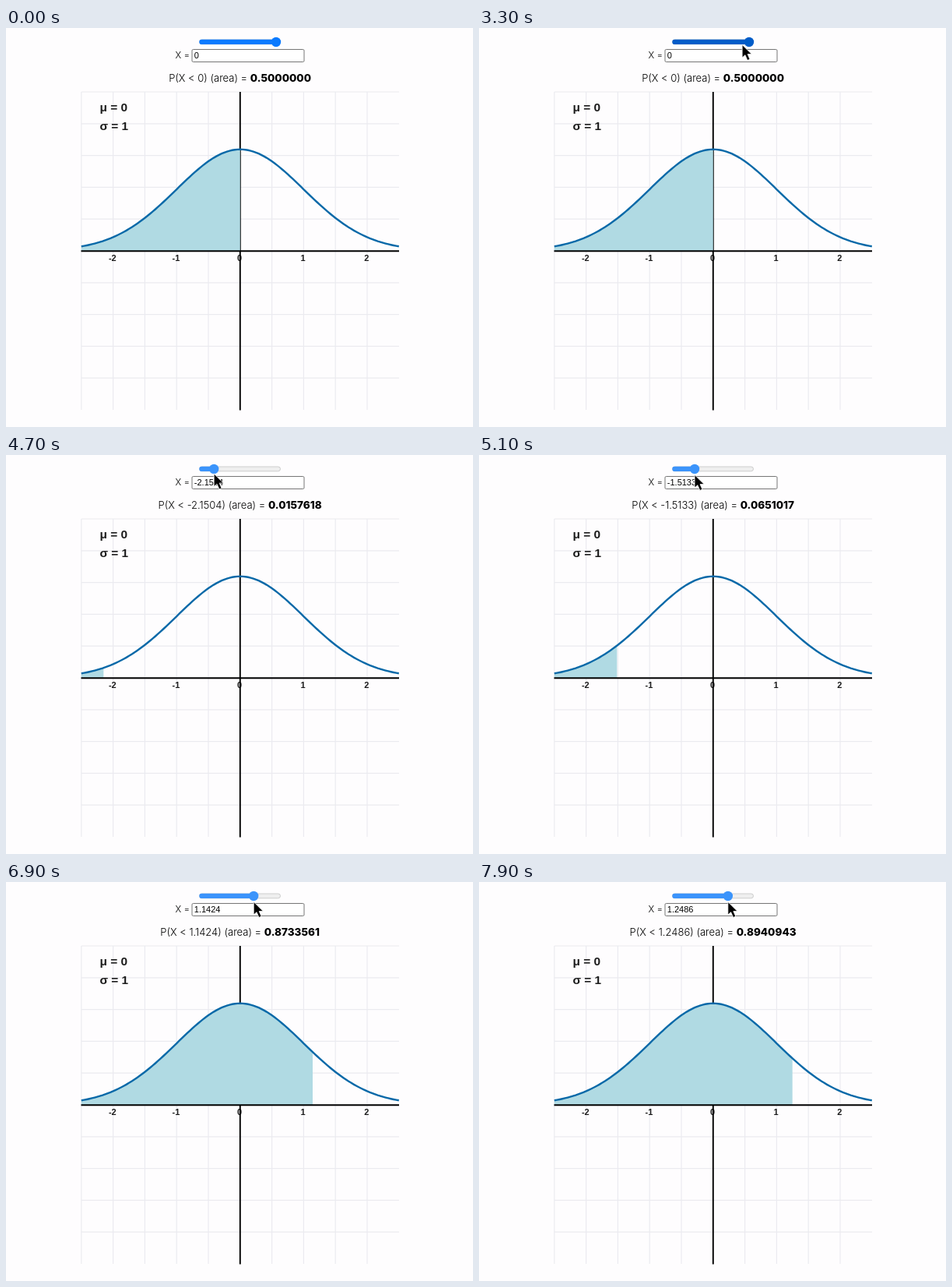
Animation of 600 by 512 pixels, one loop 8 s. Source, as an HTML page:

```html
<!DOCTYPE html>
<html lang="en">
<head>
<meta charset="utf-8">
<title>Normal distribution area</title>
<style>
  html, body { margin: 0; width: 100%; height: 100%; overflow: hidden; background: #fefdfe; }
  svg { display: block; width: 100vw; height: 100vh; }
  .label { font-family: Inter, sans-serif; font-weight: 300; fill: #000; white-space: pre; }
  .bold { font-family: "Liberation Sans", Arial, sans-serif; font-weight: 700; fill: #1c1c1c; }
</style>
</head>
<body>
<svg viewBox="0 0 600 512">
  <rect x="248.5" y="15" width="104" height="5.8" rx="2.9" fill="#efefef" stroke="#c3c3c3" stroke-width=".8"/>
  <g id="accent">
    <rect id="filled" x="248.3" y="14.8" height="6.2" rx="3.1"/>
    <circle id="thumb" cy="18" r="6.2"/>
  </g>

  <text class="label" x="217.5" y="39.3" font-size="11.6">X =</text>
  <rect x="239" y="27.5" width="144" height="16" rx="1.5" fill="#fff" stroke="#767676"/>
  <text id="entry" x="241.8" y="39.2" font-size="11" font-family="Liberation Sans, Arial, sans-serif"></text>
  <text class="label" x="300.6" y="68.5" font-size="13" text-anchor="middle"><tspan id="formula"></tspan><tspan id="result" font-weight="800" font-size="13.5"></tspan></text>

  <path id="grid" stroke="#ebebf0" stroke-width="1.2"/>
  <g id="ticks" class="bold" font-size="11" text-anchor="middle"></g>
  <path d="M300.8 82V490.5" stroke="#000" stroke-width="1.9"/>
  <path id="area" fill="#b0dae3"/>
  <path d="M96.5 286.3H505" stroke="#000" stroke-width="1.9"/>
  <path id="curve" fill="none" stroke="#0969a8" stroke-width="2.4"/>
  <g class="bold" font-size="15.4">
    <text x="120.5" y="106.8">μ = 0</text>
    <text x="120.5" y="131.3">σ = 1</text>
  </g>

  <path id="cursor" d="M0 0V16.6L3.8 13.2L6.8 20L9.9 18.6L7 12.1H12.2Z" fill="#000" stroke="#fff" stroke-width=".8"/>
</svg>
<script>
const LOOP = 8000, FRAME = 100;
const ENTER = 1500, HOVER = 2300, DRAG = 3800, REGRAB = 6650;
const UNIT = 81.6, X0 = 300.8, Y0 = 286, X_MIN = -2.5, X_MAX = 2.5;
const LIMIT = 3, PIXEL = 2 * LIMIT / 113;

// Where the knob reverses: [time, x]
const turns = [
  [3971, 3], [4937, -3], [5400, 2.4], [5900, -3],
  [REGRAB, -3], [7050, 3], [7634, -2.6], [8062, 3]
];

const $ = id => document.getElementById(id);
const set = (id, attrs) => {
  for (const name in attrs) $(id).setAttribute(name, attrs[name]);
};
const clamp = (v, lo, hi) => Math.min(hi, Math.max(lo, v));
const progress = (t, from, to) => clamp((t - from) / (to - from), 0, 1);

const px = x => X0 + x * UNIT;
const thumbX = x => 254 + 15.5 * (x + LIMIT);
const pdf = x => Math.exp(-x * x / 2) / Math.sqrt(2 * Math.PI);
const py = x => Y0 - pdf(x) * 4 * UNIT;

// Simpson's rule from the mean to x
function cdf(x, steps = 200) {
  const h = x / steps;
  let sum = pdf(0) + pdf(x);
  for (let i = 1; i < steps; i++) sum += (i % 2 ? 4 : 2) * pdf(i * h);
  return 0.5 + sum * h / 3;
}

// Swings between the turns, in whole mouse pixels from where the knob was grabbed
function dragValue(t) {
  const i = Math.max(1, turns.findIndex(([time]) => time >= t));
  const [t0, a] = turns[i - 1], [t1, b] = turns[i];
  const x = a + (b - a) * (1 - Math.cos(Math.PI * progress(t, t0, t1))) / 2;
  const grab = t > REGRAB ? 0.0008 : 0;
  const snapped = Math.round((x + LIMIT) / PIXEL) * PIXEL - LIMIT + grab;
  return +clamp(snapped, -LIMIT, LIMIT).toFixed(4);
}

function pointer(t, knob) {
  if (t >= DRAG) return [knob, 22 + 3.5 * progress(t, 4200, 5100)];
  const away = 228 * (1 - progress(t, ENTER, HOVER) ** 0.74);
  const wiggle = 10 * Math.sin(Math.PI * progress(t, 2900, 3400));
  return [344 + away - wiggle, 21.5 + away];
}

function curvePoints(end, steps = 120) {
  return Array.from({ length: steps + 1 }, (_, i) => {
    const x = X_MIN + (end - X_MIN) * i / steps;
    return px(x).toFixed(2) + " " + py(x).toFixed(2);
  }).join("L");
}

function drawPlot() {
  let lines = "";
  for (let i = -5; i < 5; i++) {
    const offset = i * UNIT / 2;
    lines += `M${X0 + offset} 82V490M97 ${Y0 + offset}H505`;
  }
  set("grid", { d: lines });
  set("curve", { d: "M" + curvePoints(X_MAX) });
  for (let n = -2; n <= 2; n++) {
    $("ticks").innerHTML += `<text x="${px(n) - 0.8}" y="299">${n}</text>`;
  }
}

function render(t) {
  const dragging = t >= DRAG;
  const x = dragging ? dragValue(t) : 0;
  const knob = thumbX(dragging ? x : LIMIT);

  set("accent", { fill: dragging ? "#3b94fb" : t >= HOVER ? "#005cc8" : "#0a7aff" });
  set("filled", { width: knob - 248.3 });
  set("thumb", { cx: knob });
  $("entry").textContent = x;
  $("formula").textContent = `P(X < ${x}) (area) = `;
  $("result").textContent = cdf(x).toFixed(7);

  const end = clamp(x, X_MIN, X_MAX);
  set("area", { d: `M${px(X_MIN)} ${Y0}L${curvePoints(end)}V${Y0}Z` });
  set("cursor", {
    visibility: t >= ENTER ? "visible" : "hidden",
    transform: `translate(${pointer(t, knob)})`
  });
}

drawPlot();
const start = performance.now();
function tick() {
  const t = (performance.now() - start) % LOOP;
  render(Math.floor(t / FRAME) * FRAME);
  requestAnimationFrame(tick);
}
tick();
</script>
</body>
</html>
```
